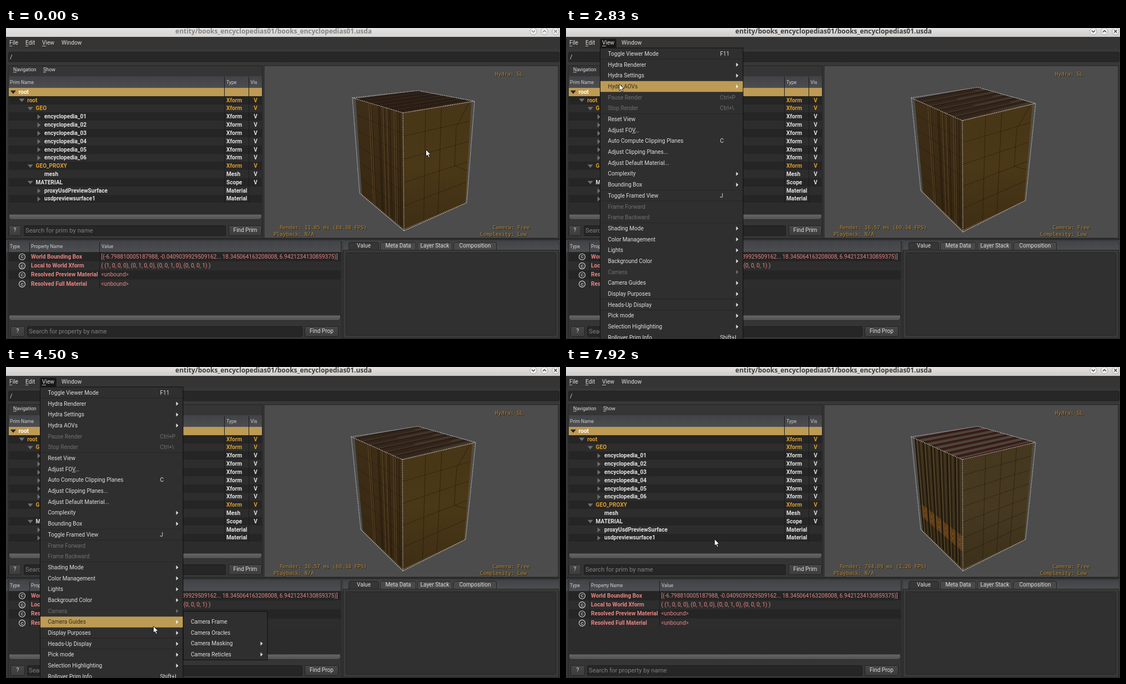
Animation of 998x561 px, one loop 8 s. Source, as an HTML page with a canvas:

```html
<!DOCTYPE html>
<html lang="en">
<head>
<meta charset="utf-8">
<title>Prim viewer</title>
<style>
  html, body { margin: 0; width: 100%; height: 100%; overflow: hidden; background: #383838; }
  canvas { display: block; }
</style>
</head>
<body>
<canvas id="stage" width="998" height="561"></canvas>
<script>
const c = document.getElementById('stage').getContext('2d');
const UI = 'Roboto, sans-serif', GOLD = '#bd9b54', LIGHT = '#dedede', RED = '#e68483', ORANGE = '#de9e2e';
const LOOP = 8000, FPS = 12;

const lerp = (a, b, t) => a + (b - a) * t;
const mix = (p, q, t) => [lerp(p[0], q[0], t), lerp(p[1], q[1], t)];

function box(x, y, x2, y2, fill, stroke, r = 0) {
  c.beginPath();
  c.roundRect(x, y, x2 - x, y2 - y, r);
  if (fill) { c.fillStyle = fill; c.fill(); }
  if (stroke) { c.strokeStyle = stroke; c.lineWidth = 1; c.stroke(); }
}
function shade(y, y2, ...colors) {
  const g = c.createLinearGradient(0, y, 0, y2);
  colors.forEach((col, i) => g.addColorStop(i / (colors.length - 1), col));
  return g;
}
function text(s, x, y, color = LIGHT, size = 10.05, weight = 400, align = 'left', family = UI) {
  c.font = `${weight} ${size}px ${family}`;
  c.textBaseline = 'middle';
  c.textAlign = align;
  c.fillStyle = color;
  c.fillText(s, x, y);
}
function line(color, width, ...pts) {
  c.beginPath();
  pts.forEach(p => c.lineTo(...p));
  c.strokeStyle = color;
  c.lineWidth = width;
  c.stroke();
}
function poly(fill, ...pts) {
  c.beginPath();
  pts.forEach(p => c.lineTo(...p));
  c.closePath();
  c.fillStyle = fill;
  c.fill();
}
function button(x, y, x2, y2, label) {
  box(x + .5, y + .5, x2 - .5, y2 - .5, shade(y, y2, '#474747', '#3c3c3c'), '#222', 2);
  text(label, (x + x2) / 2, (y + y2) / 2, LIGHT, 10.1, 400, 'center');
}
function field(x, y, x2, y2, hint) {
  box(x + .5, y + .5, x2 - .5, y2 - .5, '#262626', '#1d1d1d', 2);
  text(hint, x + 3, (y + y2) / 2, '#808080', 11.2);
}
const scrollbar = (x, y, x2, y2) => box(x + .5, y, x2 - .5, y2, shade(y, y2, '#676767', '#515151'), '#2b2b2b', [0, 0, 5, 5]);
const header = (x, y, x2, y2) => box(x, y, x2, y2, shade(y, y2, '#424346', '#4c4d50'));

function titleBar(focused) {
  box(0, 0, 998, 16, shade(0, 16, '#e4e2e0', focused ? '#cfcdcb' : '#d8d6d4'));
  const ink = focused ? '#3c3c3c' : '#858585';
  text('entity/books_encyclopedias01/books_encyclopedias01.usda', 482, 6.5, ink, 11.95, 700, 'center', '"Noto Sans", sans-serif');
  [950, 970, 990].forEach((x, i) => {
    c.beginPath();
    c.arc(x, 6, 6.3, 0, 7);
    c.fillStyle = '#efeeed';
    c.fill();
    c.strokeStyle = '#a5a3a1';
    c.lineWidth = 1;
    c.stroke();
    if (i < 2) {
      const d = i ? -1.5 : 1.5;
      line(ink, 1.3, [x - 3, 6 - d], [x, 6 + d], [x + 3, 6 - d]);
    } else {
      line(ink, 1.3, [x - 2.5, 3.5], [x + 2.5, 8.5]);
      line(ink, 1.3, [x + 2.5, 3.5], [x - 2.5, 8.5]);
    }
  });
}

function menuBar(hot, open) {
  box(0, 16, 998, 38, '#353535');
  if (hot) box(61.5, 19.5, 90.5, 36, open ? '#181818' : '#292929', '#202020', 2);
  [['File', 6, 5], ['Edit', 35, 5], ['View', 65, 7], ['Window', 100, 0]].forEach(([s, x, u]) => {
    text(s, x, 27.4, LIGHT, 10.2);
    if (u) box(x, 32, x + u, 32.8, LIGHT);
  });
  box(4.5, 43.5, 996.5, 61, '#272727', '#202020', 2);
  text('/', 7, 53, LIGHT, 11);
}

const TREE = [['root', 0, 1, 0], ['root', 1, 1, 1], ['GEO', 2, 1, 1],
  ...[1, 2, 3, 4, 5, 6].map(n => ['encyclopedia_0' + n, 3, 2, 0]),
  ['GEO_PROXY', 2, 1, 1], ['mesh', 3, 0, 0, 'Mesh'], ['MATERIAL', 2, 1, 0, 'Scope'],
  ['proxyUsdPreviewSurface', 3, 2, 0, 'Material'], ['usdpreviewsurface1', 3, 2, 0, 'Material']];

function treePanel() {
  box(4, 68, 462, 380, '#353535', '#222');
  text('Navigation', 13, 75.5, LIGHT, 8.7);
  text('Show', 67, 75.5, LIGHT, 8.9);
  box(13, 79.5, 19, 80.3, LIGHT);
  box(67, 79.5, 72, 80.3, LIGHT);
  header(5, 87, 461, 108);
  text('Prim Name', 7, 98, '#d0d0d0', 8.6);
  text('Type', 397, 98, '#d0d0d0', 8.6);
  text('Vis', 440.5, 98, '#d0d0d0', 8.6);
  box(5, 108, 461, 337, '#2c2c2c');
  TREE.forEach(([name, depth, arrow, arc, type = 'Xform'], i) => {
    const y = 108 + i * 14.82, m = y + 7.8, color = arc ? ORANGE : '#e3e3e3';
    box(5, Math.round(y), 461, Math.round(y + 14.82), i ? (i % 2 ? '#252525' : '#2d2d2d') : GOLD);
    const x = 13 + depth * 15.4, ink = i ? '#707070' : '#222';
    if (arrow === 1) poly(ink, [x - 5, m - 3], [x + 5, m - 3], [x, m + 3]);
    if (arrow === 2) poly(ink, [x - 2.5, m - 4.5], [x + 3, m], [x - 2.5, m + 4.5]);
    text(name, 22.7 + depth * 15.45, m, i ? color : '#fff', 10.08, 700);
    if (!i) return;
    text(type, 397, m, color, 10.08, 700);
    if (type !== 'Material') text('V', 449.5, m, color, 10.08, 700, 'center');
  });
  [393.5, 437.5].forEach(x => line('#1c1c1c', 1, [x, 88], [x, 316]));
  scrollbar(5, 336, 461, 345.5);
  button(5, 356, 27, 375, '?');
  field(32, 356, 396, 375, 'Search for prim by name');
  button(401, 356, 461, 375, 'Find Prim');
}

function propertyPanel() {
  box(4, 384, 604, 561, '#353535', '#222');
  header(5, 384, 603, 404);
  text('Type', 7, 394, '#d0d0d0', 8.5);
  text('Property Name', 45, 394, '#d0d0d0', 8.55);
  text('Value', 172, 394, '#d0d0d0', 8.55);
  box(5, 404, 603, 519, '#2c2c2c');
  [['World Bounding Box', '[(-6.798810005187988, -0.0409039929509162... 18.345064163208008, 6.9421234130859375)]'],
   ['Local to World Xform', '( (1, 0, 0, 0), (0, 1, 0, 0), (0, 0, 1, 0), (0, 0, 0, 1) )'],
   ['Resolved Preview Material', '<unbound>'], ['Resolved Full Material', '<unbound>']].forEach(([name, value], i) => {
    const y = 412.7 + i * 16.4;
    box(5, y - 8.2, 603, y + 8.2, i % 2 ? '#2d2d2d' : '#252525');
    c.beginPath();
    c.arc(29, y, 5.5, 0, 7);
    c.strokeStyle = LIGHT;
    c.lineWidth = 1.1;
    c.stroke();
    text('C', 29, y + .3, LIGHT, 8, 500, 'center');
    text(name, 45, y, RED, 10.12, 700);
    text(value, 171.5, y, RED, 10.05);
  });
  [42.5, 168.5].forEach(x => line('#1c1c1c', 1, [x, 386], [x, 470]));
  scrollbar(5, 518, 603, 527.5);
  button(8, 538, 34, 557, '?');
  field(38, 538, 534, 557, 'Search for property by name');
  button(538, 538, 599, 557, 'Find Prop');
}

function tabPanel() {
  box(607, 384, 996, 561, '#353535', '#222');
  header(607, 384, 996, 400);
  [['Value', 617, 672], ['Meta Data', 674, 739], ['Layer Stack', 741, 804], ['Composition', 806, 884]].forEach(([s, x, x2], i) => {
    box(x + .5, 386.5, x2 - .5, 401, i ? '#4a4a4a' : '#363636', '#222', [3, 3, 0, 0]);
    text(s, (x + x2) / 2, 393.5, LIGHT, 10.05, 400, 'center');
  });
  box(607.5, 400.5, 995.5, 559.5, '#393939', '#272727');
  box(612.5, 405.5, 990.5, 554.5, '#303030', '#252525', 2);
}

// A face is [topLeft, topRight, bottomRight, bottomLeft]; at() maps (u, v) onto it.
const at = (f, u, v) => mix(mix(f[0], f[1], u), mix(f[3], f[2], u), v);
const strip = (f, color, u, u2, v = 0, v2 = 1) => poly(color, at(f, u, v), at(f, u2, v), at(f, u2, v2), at(f, u, v2));
const seam = (f, color, w, ...uv) => line(color, w, ...uv.map(p => at(f, ...p)));

function books(tilt, full) {
  const P = (x, y, x2, y2) => mix([x, y], [x2, y2], tilt);
  const tl = P(624, 126, 622, 126), back = P(742, 113, 742, 107), tr = P(844, 132, 846, 136), mid = P(715, 153, 714, 167);
  const bl = P(637, 298, 639, 293), low = P(717, 366, 715, 368), br = P(830, 315, 828, 311);
  const il = P(630, 128, 628, 128), ibl = P(641, 300, 643, 296);
  const left = [il, mid, [low[0], low[1] - 3], ibl];
  const right = [mid, [tr[0] - 5, tr[1] + 1], [br[0] - 2, br[1] + 1], [low[0], low[1] - 3]];
  const top = [il, back, [tr[0] - 4, tr[1]], mid];

  poly(shade(130, 365, ...(full ? ['#3b2f1b', '#352917', '#2d2211'] : ['#3e2e17', '#3b2b15', '#332511'])), ...left);
  poly(shade(140, 360, ...(full ? ['#44381f', '#473921', '#3c301a'] : ['#473617', '#4a3817', '#3e2e14'])), ...right);
  poly(full ? '#4d443b' : tilt > .5 ? '#413529' : '#32261c', ...top);

  for (let i = 0; i < 6; i++) {
    const u = i / 6;
    strip(top, full ? '#3a1812' : '#291b13', 0, 1, u, u + (full ? .055 : .045));
    seam(top, full ? '#241410' : '#20160f', .9, [0, u + .07], [1, u + .07]);
    if (!full) {
      strip(top, 'rgba(48,31,19,.6)', 0, lerp(.85, .45, i % 2), u + .08, u + .14);
      continue;
    }
    strip(left, '#1c140b', u, u + .025);
    strip(left, '#4f4227', u + .035, u + .06);
    strip(left, '#271d0f', u + .07, u + .095);
    strip(left, '#463921', u + .115, u + .14);
    strip(left, 'rgba(140,88,26,.45)', u + .03, u + .16, .7, .84);
    for (let j = 0; j < 5; j++) {
      const v = .72 + j * .022, d = j % 2 * .035;
      seam(left, j % 2 ? '#96602a' : '#6f351c', 1, [u + .055 + d, v], [u + .11 - d / 2, v + .02]);
    }
  }
  if (full) strip(top, '#3a1812', 0, 1, .965, 1);
  else {
    [.27, .31, .57, .65, .8, .84].forEach(u => {
      strip(left, '#554223', u, u + .018);
      seam(left, '#261a0d', .8, [u + .03, 0], [u + .03, 1]);
    });
    [.48, .51, .72, .93].forEach(u => seam(left, '#221809', 1, [u, 0], [u, 1]));
    for (let j = 1; j < 6; j++) seam(left, 'rgba(20,13,5,.4)', .8, [0, j / 6], [1, j / 6 + .015]);
  }

  const ink = 'rgba(24,17,6,.55)';
  const rows = full ? 7 : 5;
  for (let j = 1; j < rows; j++) seam(right, ink, .8, [0, j / rows], [1, j / rows - .01]);
  [.33, .56].forEach(u => seam(right, ink, .9, [u, 0], [u - .01, 1]));
  if (full) seam(right, ink, .9, [.77, 0], [.76, 1]);
  else seam(right, ink, .9, [.96, .01], [.79, .22], [.79, .59], [1, .68]);
  seam(right, full ? '#57482a' : '#5f4b28', 1.4, [0, 1], [1, 1], [1, 0]);
  seam(left, '#503e1f', 1.2, [0, 1], [1, 1]);
  seam(right, full ? '#50281f' : '#524022', 1.2, [0, .005], [1, .005]);

  c.setLineDash([1.6, 1.6]);
  line('#d8d8d8', 1.1, tl, back, tr, br, low, bl, tl, mid, tr);
  line('#d8d8d8', 1.1, mid, low);
  c.setLineDash([]);
}

function viewport(k) {
  const full = k >= 88, step = Math.max(0, Math.min(3, k - 1));
  box(465, 68, 995, 379, '#4c4c4c', '#222');
  books(step / 3, full);
  const rate = full ? '794.09 ms (1.26 FPS)'
    : ['11.85 ms (84.38 FPS)', '14.21 ms (70.37 FPS)', '15.64 ms (63.94 FPS)', '16.57 ms (60.34 FPS)'][step];
  [['Hydra: GL', 881, 83.5], ['  Render: ' + rate, 482, 361], ['Playback: N/A', 482, 372.5],
   ['Camera: Free', 876.5, 361], ['Complexity: Low', 854, 372.5]].forEach(([s, x, y]) => {
    text(s, x + 1, y + 1, '#1c1710', 9.3, 400, 'left', '"DejaVu Sans Mono", monospace');
    text(s, x, y, '#b88a34', 9.3, 400, 'left', '"DejaVu Sans Mono", monospace');
  });
}

// Menu entries: '>' opens a submenu, '-' is disabled, text after '|' is the shortcut.
const MENU = ['Toggle Viewer Mode|F11', 'Hydra Renderer>', 'Hydra Settings>', 'Hydra AOVs>', '-Pause Render|Ctrl+P',
  '-Stop Render|Ctrl+\\', 'Reset View', 'Adjust FOV...', 'Auto Compute Clipping Planes|C', 'Adjust Clipping Planes...',
  'Adjust Default Material...', 'Complexity>', 'Bounding Box>', 'Toggle Framed View|J', '-Frame Forward',
  '-Frame Backward', 'Shading Mode>', 'Color Management>', 'Lights>', 'Background Color>', '-Camera>',
  'Camera Guides>', 'Display Purposes>', 'Heads-Up Display>', 'Pick mode>', 'Selection Highlighting>', 'Rollover Prim Info|Shift+I'];
const PITCH = 19.69;

function menu(items, x, y, x2, y2, hot, pad = 13.5, head = 0) {
  box(x - .5, y - .5, x2 + .5, y2 + .5, '#2f2f2f', '#0e0e0e');
  items.forEach((item, i) => {
    const off = item[0] === '-', m = y + head + 10 + i * PITCH, on = i === hot && !off;
    const [label, key] = item.replace(/^-|>$/g, '').split('|');
    if (on) box(x, m - 9.8, x2, m + 9.8, GOLD);
    const color = on ? '#332c1e' : off ? '#707070' : LIGHT;
    text(label, x + pad, m + .4, color);
    if (key) text(key, x + 215.5, m + .4, color);
    if (item.endsWith('>')) poly(on ? '#eee' : color, [x2 - 12, m - 3.7], [x2 - 8, m], [x2 - 12, m + 3.7]);
  });
}

function menus(k, x, y) {
  const row = x > 319 ? 22 : Math.floor((y - 36.5) / PITCH);
  menu(MENU, 62, 36.5, 318.5, 570, row);
  box(119, 189, 125.5, 189.8, LIGHT);
  [0, 5, 12, 13, 15, 22, 23].forEach(i => {
    if (row !== i && row !== i + 1) box(63, 36 + (i + 1) * PITCH, 318, 36.8 + (i + 1) * PITCH, '#232323');
  });
  if (k >= 53 && k < 58) menu(['Camera Frame', 'Camera Oracles', 'Camera Masking>', 'Camera Reticles>'], 320, 441.5, 470.5, 528, -1, 13, 8);
  if (k >= 58) {
    const hot = x > 320 ? Math.floor((y - 469) / PITCH) : -1;
    menu(['Guide', 'Proxy', 'Render'], 320, 469, 417, 528, hot, 13);
    if (hot >= 0) line('#9c7d3c', 1, [329.5, 469 + hot * PITCH], [329.5, 469 + (hot + 1) * PITCH]);
    line(hot === 1 ? '#332c1e' : LIGHT, 1.5, [322, 498.5], [324, 500.5], [327.5, 496]);
  }
}

// Pointer keys: step, x, y.
const PATH = [[1, 756, 219], [4, 756, 234], [7, 756, 234], [10, 560, 205], [14, 190, 100], [17, 68, 41], [18, 66, 39],
  [19, 66, 39], [21, 61, 31], [33, 61, 31], [35, 130, 170], [38, 219, 357], [43, 240, 389], [46, 246, 406], [53, 264, 464],
  [54, 265, 467], [56, 266, 472], [66, 266, 472], [71, 353, 503], [73, 353, 503], [75, 369, 515], [92, 369, 515], [95, 267, 310]];

function pointerAt(k) {
  const i = PATH.findIndex(p => p[0] >= k);
  if (i <= 0) return PATH[0].slice(1);
  const a = PATH[i - 1], b = PATH[i];
  return mix(a.slice(1), b.slice(1), (k - a[0]) / (b[0] - a[0]));
}

function pointer(x, y) {
  c.save();
  c.translate(x + .5, y + .5);
  const shape = [[0, 0], [0, 12], [2.8, 9.5], [4.8, 14], [6.8, 13.2], [4.9, 8.8], [8.5, 8.5], [0, 0]];
  poly('#fff', ...shape);
  line('#111', .9, ...shape);
  c.restore();
}

function draw(now) {
  const k = Math.floor((now % LOOP + 4) * FPS / 1000) % 96;
  const [x, y] = pointerAt(k), open = k >= 26 && k < 88;
  box(0, 0, 998, 561, '#383838');
  titleBar(k >= 26);
  menuBar(k >= 20 && k < 88, open);
  treePanel();
  viewport(k);
  box(0, 380, 998, 382, '#262626');
  header(0, 382, 998, 404);
  propertyPanel();
  tabPanel();
  if (open) menus(k, x, y);
  pointer(x, y);
  requestAnimationFrame(() => draw(performance.now() - start));
}
const start = performance.now();
draw(0);
</script>
</body>
</html>
```
